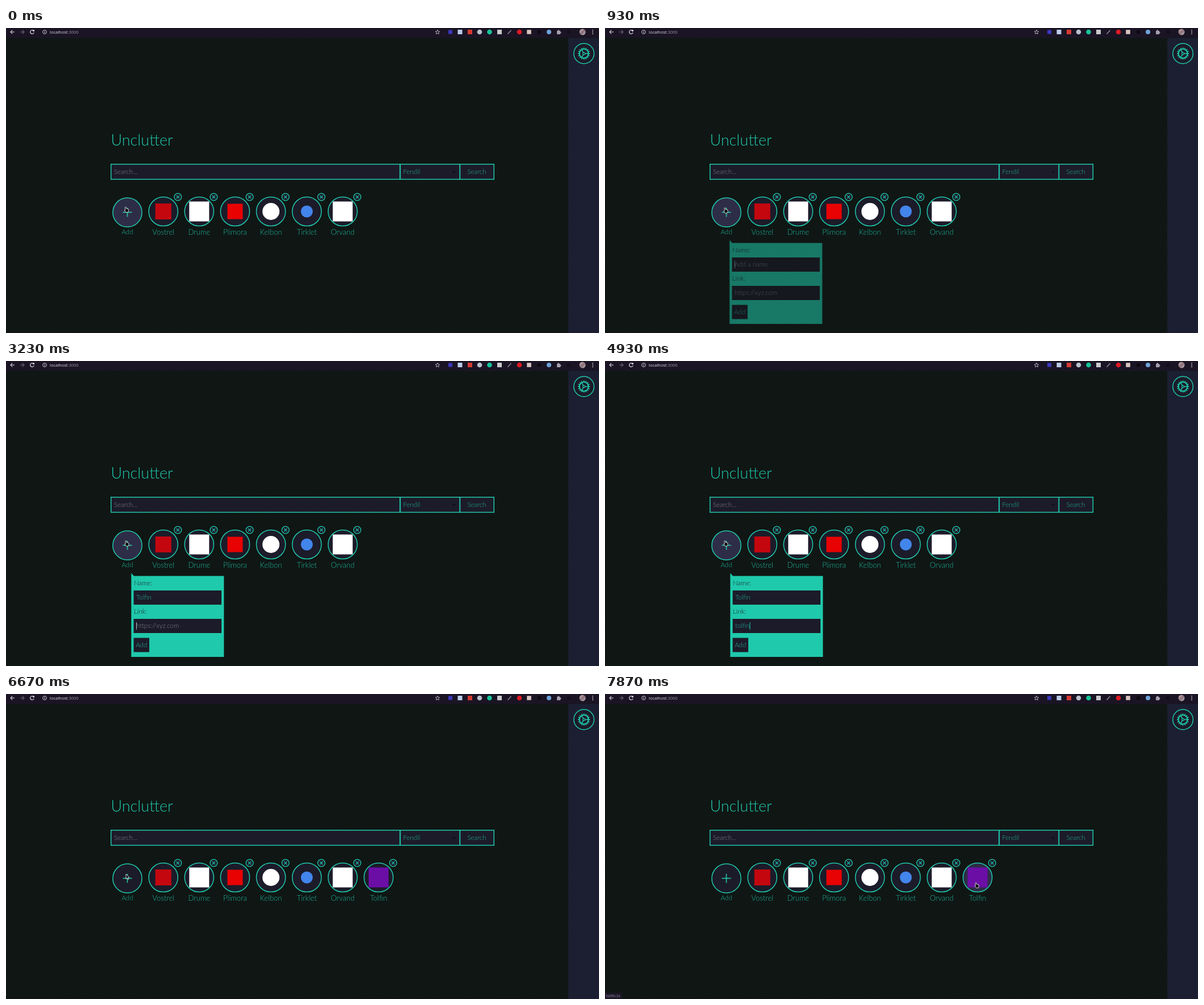
Write an HTML page with a canvas that moves like this. It is 1043x537 px and loops after 8000 ms.

```html
<!DOCTYPE html>
<html lang="en">
<head>
<meta charset="utf-8">
<title>Unclutter</title>
<style>
html, body { margin: 0; width: 100%; height: 100%; overflow: hidden; background: #0e1413; }
canvas { display: block; }
</style>
</head>
<body>
<canvas id="stage" width="1043" height="537"></canvas>
<script>
const W = 1043, H = 537, LOOP = 8000;
const TEAL = '#1fc9ab', DIM = '#1fb59b', DARK = '#1c1b29', HOVER = '#2e2d47', GREY = '#82828c';
const LIGHT = 'Lato, "Open Sans", sans-serif', UI = '"Open Sans", "Noto Sans", sans-serif';
const POPUP_IN = 765, POPUP_OUT = 6070, ICON_LOADED = 6250;

const stage = document.getElementById('stage').getContext('2d');
const layer = makeCanvas(W, H);
let g = stage;

const tiles = [
  { name: 'Vostrel', color: '#c4070f', size: 28 },
  { name: 'Drume', color: '#ffffff', size: 35 },
  { name: 'Plimora', color: '#e80202', size: 27 },
  { name: 'Kelbon', color: '#ffffff', size: 30, round: true },
  { name: 'Tirklet', color: '#4285eb', size: 21, round: true },
  { name: 'Orvand', color: '#ffffff', size: 35 },
  { name: 'Tolfin', color: '#6b0ea6', size: 35, link: 'tolfin.tv' }
];
const nameKeys = [1600, 2200, 2400, 2530, 2700, 2800];
const linkKeys = [3770, 4330, 4500, 4630, 4800, 4930, 5300, 5500, 5730];

// time, x, y of the pointer tip
const path = [
  [6700, 211, 317], [6950, 300, 284], [7200, 430, 268],
  [7470, 562, 300], [7650, 625, 324], [7870, 653, 332]
];

function makeCanvas(w, h) {
  const c = document.createElement('canvas');
  c.width = w;
  c.height = h;
  return c.getContext('2d');
}

function makeHatch() {
  const c = makeCanvas(4, 4), tones = ['#0a0e0e', '#0e1413', '#151f1a', '#111916'];
  for (let y = 0; y < 4; y++) for (let x = 0; x < 4; x++) {
    c.fillStyle = tones[(x + y) % 4];
    c.fillRect(x, y, 1, 1);
  }
  return stage.createPattern(c.canvas, 'repeat');
}
const hatch = makeHatch();

function rect(x, y, w, h, color) {
  g.fillStyle = color;
  g.fillRect(x, y, w, h);
}

function frame(x, y, w, h) {
  rect(x, y, w, h, DARK);
  g.strokeStyle = TEAL;
  g.lineWidth = 1.5;
  g.strokeRect(x, y, w, h);
}

function circle(x, y, r, fill, stroke, width = 1.5) {
  g.beginPath();
  g.arc(x, y, r, 0, Math.PI * 2);
  if (fill) { g.fillStyle = fill; g.fill(); }
  if (stroke) { g.strokeStyle = stroke; g.lineWidth = width; g.stroke(); }
}

function square(x, y, s, color) {
  rect(x - s / 2, y - s / 2, s, s, color);
}

function line(color, width, ...pts) {
  g.beginPath();
  for (let i = 0; i < pts.length; i += 2) g.lineTo(pts[i], pts[i + 1]);
  g.strokeStyle = color;
  g.lineWidth = width;
  g.stroke();
}

function text(str, x, y, size, color, align = 'left', font = LIGHT) {
  g.font = (font === LIGHT ? '300 ' : '400 ') + size + 'px ' + font;
  g.textAlign = align;
  g.fillStyle = color;
  g.fillText(str, x, y);
  return g.measureText(str).width;
}

// underdamped spring going from 1 to 0
function spring(ms) {
  const s = ms / 1000, w = 18.54;
  if (s <= 0) return 1;
  if (s > 0.37) return 0;
  return Math.exp(-12.5 * s) * (Math.cos(w * s) + 12.5 / w * Math.sin(w * s));
}

function along(t) {
  const last = path.length - 1;
  if (t <= path[0][0]) return path[0].slice(1);
  if (t >= path[last][0]) return path[last].slice(1);
  let i = 0;
  while (t >= path[i + 1][0]) i++;
  const slope = (k, d) => k === 0 || k === last ? 0
    : (path[k + 1][d] - path[k - 1][d]) / (path[k + 1][0] - path[k - 1][0]);
  const a = path[i], b = path[i + 1], span = b[0] - a[0], u = (t - a[0]) / span, v = 1 - u;
  return [1, 2].map(d =>
    a[d] * (1 + 2 * u) * v * v + b[d] * u * u * (3 - 2 * u) +
    span * u * v * (slope(i, d) * v - slope(i + 1, d) * u));
}

function pointer(t) {
  if (t < 270) return [211, 315];
  if (t < 500) return [212, 317];
  if (t < 6670) return [211.5, 316.5];
  return along(t);
}

function drawBrowserBar() {
  rect(0, 0, W, 17.5, '#1a1424');
  const ink = '#d6d2de', faint = '#6c6678';
  line(ink, 1.1, 15, 7, 8, 7);
  line(ink, 1.1, 11.3, 3.7, 8, 7, 11.3, 10.3);
  line(faint, 1.1, 25, 7, 32, 7);
  line(faint, 1.1, 28.7, 3.7, 32, 7, 28.7, 10.3);
  g.beginPath();
  g.arc(46, 7, 3.3, 0.3, 5.5);
  g.strokeStyle = ink;
  g.lineWidth = 1.2;
  g.stroke();
  rect(47, 3.4, 3, 2.6, ink);
  circle(68, 7, 3.4, null, ink, 0.9);
  rect(67.5, 6.5, 1, 2.5, ink);
  rect(67.5, 4.8, 1, 1, ink);
  const w = text('localhost', 77, 9.8, 7.5, '#dedae6', 'left', UI);
  text(':3000', 77 + w, 9.8, 7.5, '#9a94a6', 'left', UI);

  g.beginPath();
  for (let i = 0; i < 10; i++) {
    const a = i * Math.PI / 5 - Math.PI / 2, r = i % 2 ? 1.8 : 4;
    g.lineTo(759 + r * Math.cos(a), 7.3 + r * Math.sin(a));
  }
  g.closePath();
  g.strokeStyle = ink;
  g.lineWidth = 0.8;
  g.stroke();

  square(781.5, 7, 7, '#3c38bd');
  square(798.5, 7, 8, '#b9cbe8');
  square(816, 7, 8, '#d63a32');
  circle(833, 7, 4.3, '#b9c0cc');
  circle(850.5, 7, 4.3, '#15c39a');
  square(868, 7, 8, '#c9c9cd');
  line('#8c8698', 1.6, 882.5, 10.5, 888.5, 4);
  circle(903, 7, 4.3, '#dc1a24');
  square(920, 7, 7.5, '#d9c4c0');
  square(938, 7, 6, '#0d0a12');
  circle(955, 7, 4, '#6fa3d8');
  rect(969, 5, 6, 6, '#a5a0ae');
  circle(971.7, 4.5, 1.3, '#a5a0ae');
  circle(975.2, 8, 1.3, '#a5a0ae');
  square(990, 7, 6, '#120e1a');
  const face = g.createLinearGradient(1009, 2, 1019, 13);
  face.addColorStop(0, '#c9b3b4');
  face.addColorStop(0.5, '#8a6f78');
  face.addColorStop(1, '#c5c2cc');
  circle(1014, 7, 5.5, face);
  for (const y of [3.8, 7, 10.2]) circle(1032, y, 0.9, ink);
}

function drawSidebar() {
  g.globalAlpha = 0.95;
  rect(989, 17.5, 54, H, '#1c2033');
  g.globalAlpha = 1;
  const x = 1016.5, y = 45;
  circle(x, y, 17.8, DARK, TEAL);
  circle(x, y, 7.8, null, TEAL, 1.8);
  for (let i = 0; i < 16; i++) {
    const a = i * Math.PI / 8, c = Math.cos(a), s = Math.sin(a);
    line(TEAL, 1.9, x + 8 * c, y + 8 * s, x + 10.5 * c, y + 10.5 * s);
  }
  for (let i = 0; i < 3; i++) {
    const a = i * Math.PI * 2 / 3, c = Math.cos(a), s = Math.sin(a);
    line(TEAL, 1.5, x + 2 * c, y + 2 * s, x + 7.5 * c, y + 7.5 * s);
  }
  circle(x, y, 1.9, null, TEAL, 1.2);
}

function drawSearch() {
  text('Unclutter', 184.5, 207.3, 27, TEAL);
  frame(184.7, 239.8, 508.3, 26.6);
  frame(693.5, 239.8, 104.8, 26.6);
  frame(798.5, 239.8, 59.8, 26.6);
  text('Search...', 190, 257, 11.5, GREY);
  text('Fendil', 698.5, 257, 11.5, DIM);
  text('Search', 828, 257, 11.5, DIM, 'center');
  line('#0c0b14', 1.2, 785.5, 252, 788, 254.5, 790.5, 252);
}

function drawAdd(hovered) {
  circle(213.5, 324.7, 25.6, hovered ? HOVER : DARK, TEAL);
  line(TEAL, 1.6, 205.5, 324.5, 221.5, 324.5);
  line(TEAL, 1.6, 213.5, 316.5, 213.5, 332.5);
  text('Add', 213.5, 363, 11.5, DIM, 'center');
}

function drawTile(tile, x, hovered, loaded) {
  const y = 323;
  circle(x, y, 25.6, hovered ? HOVER : DARK, TEAL);
  if (loaded) {
    if (tile.round) circle(x, y, tile.size / 2, tile.color);
    else square(x, y, tile.size, tile.color);
  }
  text(tile.name, x, 363.5, 13, DIM, 'center');
  const cx = x + 25.6, cy = 297.5, d = 2.6;
  circle(cx, cy, 6.4, DARK, TEAL, 1.3);
  line(TEAL, 1.2, cx - d, cy - d, cx + d, cy + d);
  line(TEAL, 1.2, cx - d, cy + d, cx + d, cy - d);
}

function drawField(y, hint, value, caret) {
  rect(224.5, y, 154.5, 25, DARK);
  const w = text(value || hint, 229, y + 16.2, 11.5, value ? DIM : GREY);
  if (caret) rect(229 + (value ? w : 0), y + 6, 1, 13, value ? TEAL : '#8fb5b0');
}

function drawPopup(t) {
  const typed = (word, keys) => word.slice(0, keys.filter(k => k <= t).length);
  const last = tiles[tiles.length - 1], onLink = t >= 3230;
  g = layer;
  g.clearRect(0, 0, W, H);
  rect(220.3, 378.5, 163, 142.5, TEAL);
  g.beginPath();
  g.moveTo(220.3, 373.3);
  g.lineTo(225.3, 379);
  g.lineTo(220.3, 379);
  g.fill();
  text('Name:', 225, 395.3, 11.5, DARK);
  text('Link:', 225, 445.3, 11.5, DARK);
  drawField(404, 'Add a name', typed(last.name, nameKeys), !onLink && (t < 1370 || t >= 1600));
  drawField(454, 'https://xyz.com', typed(last.link, linkKeys), onLink);
  rect(224.5, 487.5, 27.5, 25, DARK);
  text('Add', 238.2, 504.2, 11.5, DIM, 'center');
  g = stage;
  g.globalAlpha = Math.min(1, (t - POPUP_IN) / 300);
  g.drawImage(layer.canvas, 10 * spring(t - POPUP_IN), 0);
  g.globalAlpha = 1;
}

function drawStatus(url) {
  g.font = '400 7px ' + UI;
  rect(0, 526, g.measureText(url).width + 5, 11, '#1d1729');
  text(url, 2, 533.7, 7, '#8f899b', 'left', UI);
}

function drawPointer(x, y, hand) {
  g.save();
  g.translate(x, y);
  g.lineJoin = 'round';
  g.beginPath();
  if (hand) {
    g.moveTo(-1.6, 0.6);
    g.quadraticCurveTo(-0.6, -0.6, 0.4, 0.6);
    g.lineTo(0.7, 3);
    g.lineTo(4.4, 3.8);
    g.lineTo(4.6, 6.5);
    g.lineTo(3.8, 9.4);
    g.lineTo(-0.2, 9.4);
    g.lineTo(-2.8, 5.8);
    g.lineTo(-1.2, 5.4);
  } else {
    for (const [px, py] of [[0, 0], [0, 8.6], [2, 6.9], [3.4, 9.8], [4.6, 9.2], [3.3, 6.4], [5.8, 6.1]]) g.lineTo(px, py);
  }
  g.closePath();
  g.fillStyle = '#08080c';
  g.fill();
  g.strokeStyle = '#e4e4e8';
  g.lineWidth = 0.9;
  g.stroke();
  g.restore();
}

function draw(t) {
  const [px, py] = pointer(t), onAdd = t < 6670;
  let hot = null;
  rect(0, 0, W, H, hatch);
  drawBrowserBar();
  drawSidebar();
  drawSearch();
  drawAdd(onAdd);
  tiles.forEach((tile, i) => {
    const added = i === tiles.length - 1;
    if (added && t < POPUP_OUT) return;
    const x = 276.7 + 63.1 * i + (added ? 20 * spring(t - POPUP_OUT) : 0);
    const hovered = Math.hypot(px - x, py - 323) < 26;
    if (hovered) hot = tile;
    drawTile(tile, x, hovered, !added || t >= ICON_LOADED);
  });
  if (t >= POPUP_IN && t < POPUP_OUT) drawPopup(t);
  if (hot) drawStatus(hot.link || hot.name.toLowerCase() + '.com');
  drawPointer(px, py, onAdd || hot);
}

const start = performance.now();
function tick() {
  draw((performance.now() - start) % LOOP);
  requestAnimationFrame(tick);
}
tick();
</script>
</body>
</html>
```
